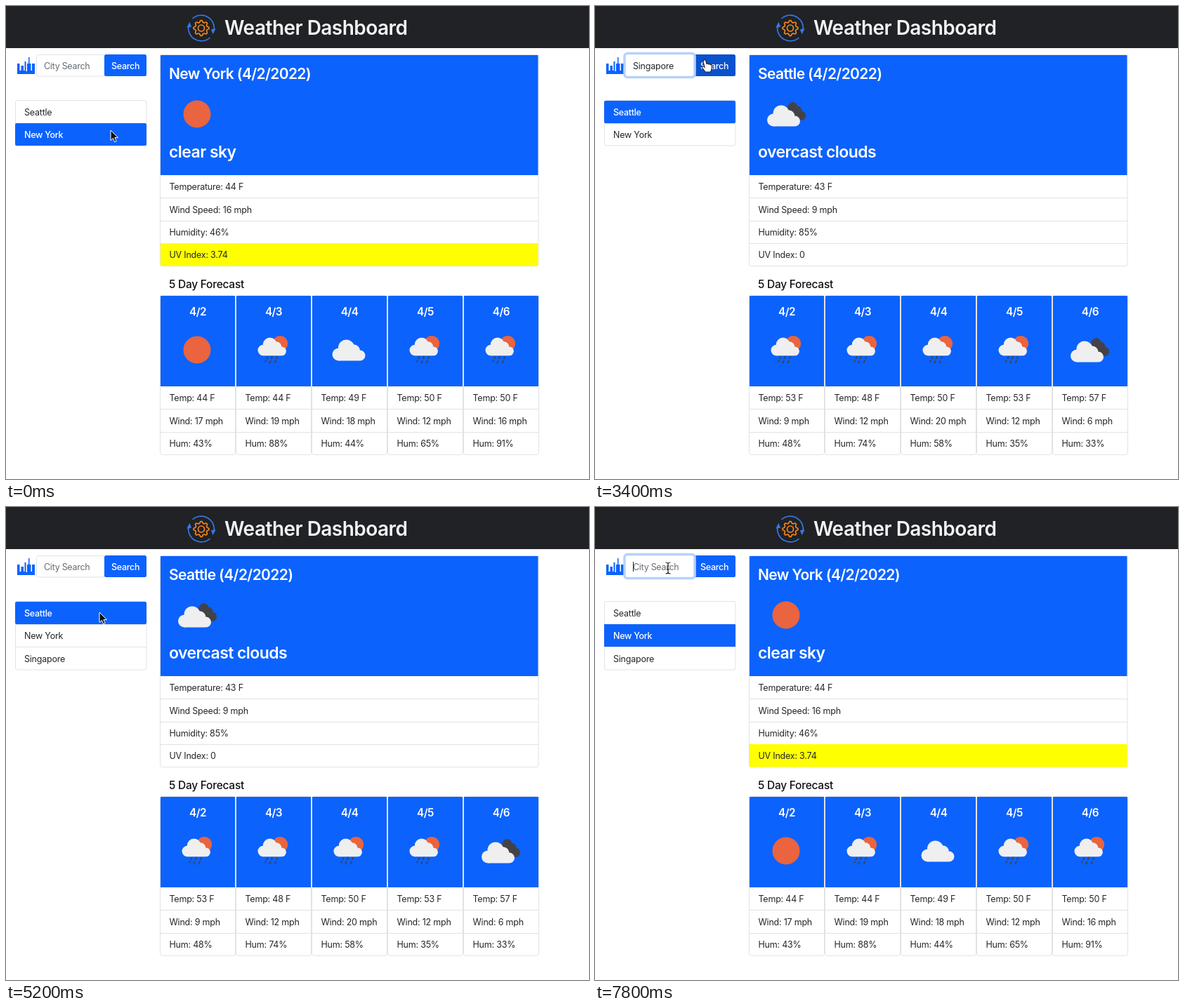
An HTML page that plays this animation: 830 px wide and 674 px high, repeating every 8 s.

```html
<!DOCTYPE html>
<html lang="en">
<head>
<meta charset="utf-8">
<title>Weather Dashboard</title>
<style>
  html, body { margin: 0; width: 100%; height: 100%; overflow: hidden; background: #fff; }
  svg { display: block; width: 830px; height: 674px; }
  text { font: 400 12.5px Inter, "Open Sans", sans-serif; letter-spacing: -.22px; fill: #24272b; white-space: pre; }
  .white { fill: #fff; font-weight: 500; letter-spacing: -.28px; }
  .hint { fill: #666d74; letter-spacing: -.28px; }
  .brand { font-size: 28px; font-weight: 600; letter-spacing: -.53px; fill: #f4f4f5; }
  .place { font-size: 21px; font-weight: 600; letter-spacing: -.65px; fill: #fff; }
  .sky { font-size: 23px; font-weight: 600; letter-spacing: -.58px; fill: #fff; }
  .sub { font-size: 15.5px; font-weight: 500; letter-spacing: -.25px; fill: #111; }
  .day { font-size: 15.3px; font-weight: 600; letter-spacing: -.5px; fill: #fff; text-anchor: middle; }
</style>
</head>
<body>
<svg id="stage" viewBox="0 0 830 674">
  <defs>
    <g id="puff">
      <circle cx="9" cy="21" r="9"/><circle cx="20" cy="11.5" r="11.5"/>
      <circle cx="30.5" cy="15.5" r="8.8"/><circle cx="39.5" cy="22.5" r="7.5"/>
      <path d="M9 16H38V30H9Z"/>
    </g>
    <g id="sun"><circle r="19.5" fill="#e9643f"/></g>
    <g id="cloud"><use href="#puff" x="-23.5" y="-14.5" fill="#efefef"/></g>
    <g id="overcast">
      <use href="#puff" transform="translate(-4 -17) scale(.68 .86)" fill="#434347"/>
      <use href="#puff" x="-27" y="-12.5" fill="#efefef"/>
    </g>
    <g id="rain">
      <circle cx="10.2" cy="-9" r="10.9" fill="#e9643f"/>
      <use href="#puff" transform="translate(-21.5 -17.5) scale(.86)" fill="#efefef"/>
      <path d="M-7.5 10l-1 2M-1 9.5l-1.2 2.6M6 10l-1 2M-10 15l-.8 1.6M-3.5 16l-1.2 2.6M4 15.5l-1.2 2.6"
        stroke="#41424c" stroke-width="1.8" stroke-linecap="round"/>
    </g>
    <path id="arrow" d="M0 0V14.5L3.4 11.4L5.7 16.8L8.2 15.7L5.9 10.5H10.4Z" fill="#111" stroke="#fff"/>
    <path id="beam" d="M-3.5 -8Q0 -8 0 -6Q0 -8 3.5 -8M0 -6V6M-3.5 8Q0 8 0 6Q0 8 3.5 8M-2 2H2" fill="none" stroke="#222" stroke-width="1.2"/>
    <path id="hand" d="M-4 -8Q-2.5 -9.5 -1.5 -7.5L0 -2.5Q1.5 -4 2.7 -2Q4 -3.2 5 -1.3Q7 -2 7.3 .5L7 5Q6.5 7 5.5 9H-2L-6.5 2.5Q-7 .3 -4.5 1L-3 2.3L-5 -6Z" fill="#fff" stroke="#222" stroke-width="1.1"/>
  </defs>
  <g id="scene"></g>
</svg>
<script>
const BLUE = '#0c62fd', DARK_BLUE = '#0a51cd', LINE = '#e1e2e4', LOOP = 8000, STEP = 200;

const weather = {
  'New York': {
    sky: 'clear sky', icon: 'sun', now: [44, 16, 46, 3.74],
    icons: ['sun', 'rain', 'cloud', 'rain', 'rain'],
    temp: [44, 44, 49, 50, 50], wind: [17, 19, 18, 12, 16], hum: [43, 88, 44, 65, 91]
  },
  Seattle: {
    sky: 'overcast clouds', icon: 'overcast', now: [43, 9, 85, 0],
    icons: ['rain', 'rain', 'rain', 'rain', 'overcast'],
    temp: [53, 48, 50, 53, 57], wind: [9, 12, 20, 12, 6], hum: [48, 74, 58, 35, 33]
  },
  Singapore: {
    sky: 'broken clouds', icon: 'overcast', now: [78, 3, 92, 0],
    icons: Array(5).fill('rain'),
    temp: [85, 84, 83, 84, 83], wind: [9, 8, 7, 9, 9], hum: [65, 67, 68, 65, 69]
  }
};

// [time, shown city]
const shown = [[0, 'New York'], [600, 'Seattle'], [4200, 'Singapore'], [5200, 'Seattle'], [6600, 'New York']];

// [time, x, y] of the pointer's hot spot
const route = [
  [0, 149, 177], [200, 148, 175], [400, 136, 153], [1000, 131, 150], [1400, 118, 110],
  [1800, 104, 87], [3000, 104, 87], [3400, 159, 85], [4000, 161, 86], [4600, 161, 86],
  [5000, 134, 151], [5200, 133, 150], [6000, 131, 151], [6400, 119, 181],
  [6800, 119, 180], [7400, 104, 87], [8000, 104, 87]
];

const text = (s, x, y, cls = '') => `<text x="${x}" y="${y}" class="${cls}">${s}</text>`;
const rect = (x, y, w, h, fill, extra = '') =>
  `<rect x="${x}" y="${y}" width="${w}" height="${h}" fill="${fill}" ${extra}/>`;
const use = (id, x, y) => `<use href="#${id}" x="${x}" y="${y}"/>`;
const outline = (x, y, w, h) => rect(x, y, w, h, '#fff', `rx="3" stroke="${LINE}"`);
const rule = (x, y, w) => rect(x, y, w, 1, LINE);

function pointerAt(t) {
  const i = route.findIndex(p => p[0] > t);
  const [a, b] = [route[i - 1], route[i]];
  const k = (t - a[0]) / (b[0] - a[0]);
  return [a[1] + (b[1] - a[1]) * k, a[2] + (b[2] - a[2]) * k];
}

const overBar = ([, y]) => y > 69 && y < 100;
const overButton = p => overBar(p) && p[0] > 140;

function gear(cx, cy) {
  const points = [];
  for (let i = 0; i < 32; i++) {
    const angle = (i - 1.5) * Math.PI / 16;
    const r = i % 4 === 1 || i % 4 === 2 ? 11 : 8.5;
    points.push(`${(cx + r * Math.cos(angle)).toFixed(1)},${(cy + r * Math.sin(angle)).toFixed(1)}`);
  }
  const arc = turn => `<g transform="translate(${cx} ${cy}) rotate(${turn})">
    <path d="M-18 4A18.5 18.5 0 0 1 12 -14" fill="none" stroke="#3478e5" stroke-width="1.6"/>
    <path d="M11 -17.5L16 -10L8.5 -11Z" fill="#3478e5"/></g>`;
  return arc(60) + arc(240) +
    `<g fill="none" stroke="#f5861f" stroke-width="1.7" stroke-linejoin="round">
    <polygon points="${points.join(' ')}"/><circle cx="${cx}" cy="${cy}" r="4.5"/></g>`;
}

const header = rect(0, 0, 830, 60, '#202226') + gear(278, 31.5) + text('Weather Dashboard', 311, 41, 'brand') +
  `<path d="M16 97V82H19.5V92H21.5V85H25V92H26.5V79H28.5V93H30V82H32V73H33.5V82H35.5V92H37V82H41V97Z" fill="${BLUE}"/>`;

function searchBar(t, pointer) {
  const inputFocus = t >= 1800 && t < 3800 || t >= 7400;
  const buttonFocus = t >= 3800 && t < 5000;
  const typed = t >= 2000 && t < 4200 ? 'Singapore'.slice(0, Math.floor((t - 2000) / 130) + 1) : '';
  const ring = (x, w, color) => rect(x, 67.5, w, 34, 'none', `rx="4" stroke="${color}" stroke-width="3.5"`);
  const caret = inputFocus && !typed ? rect(54, 78, 1, 14, '#222') : '';
  return outline(43.5, 69.5, 97, 30.5) +
    rect(140, 69, 60, 31, overButton(pointer) ? DARK_BLUE : BLUE, 'rx="2.5"') +
    (inputFocus ? rect(43, 69, 98, 31, '#fff') + ring(42, 100, '#b9d1fb') : '') +
    (buttonFocus ? ring(138.5, 63, '#86b2fb') : '') +
    text(typed || 'City Search', 54, 89.5, typed ? '' : 'hint') + caret +
    text('Search', 150, 89.5, 'white');
}

function cityList(t, current, pointer) {
  const cities = t < 4200 ? ['Seattle', 'New York'] : ['Seattle', 'New York', 'Singapore'];
  const hovered = Math.floor((pointer[1] - 135) / 32.4);
  const top = i => Math.round(134.7 + i * 32.3);
  const row = (city, i) => {
    const active = city === current || i === hovered;
    const edge = i === 0 || i === cities.length - 1;
    return (active ? rect(13, top(i), 187, top(i + 1) - top(i), BLUE, edge ? 'rx="2"' : '') : i ? rule(13, top(i), 187) : '') +
      text(city, 26, 156 + i * 32.3, active ? 'white' : '');
  };
  return outline(13.5, 134.5, 186.5, top(cities.length) - 134.5) + cities.map(row).join('');
}

function report(city) {
  const w = weather[city];
  const [temp, wind, hum, uv] = w.now;
  const lines = [`Temperature: ${temp} F`, `Wind Speed: ${wind} mph`, `Humidity: ${hum}%`, `UV Index: ${uv}`];
  return outline(219.5, 69.5, 538.5, 301.2) + rect(220, 70, 537.5, 171, BLUE) +
    text(`${city} (4/2/2022)`, 232, 104, 'place') + use(w.icon, 272, 154) + text(w.sky, 232, 216, 'sky') +
    (uv > 3 ? rect(220, 338, 537.5, 32.5, '#ff0') : '') +
    lines.map((s, i) => (i && !(i === 3 && uv > 3) ? rule(219.5, Math.round(241 + i * 32.3), 538.5) : '') +
      text(s, 232.5, 262.3 + i * 32.3)).join('');
}

function forecast(city) {
  const w = weather[city];
  const card = (icon, i) => {
    const x = 219.5 + i * 108;
    const lines = [`Temp: ${w.temp[i]} F`, `Wind: ${w.wind[i]} mph`, `Hum: ${w.hum[i]}%`];
    return outline(x, 412.5, 107, 226.8) + rect(x + .5, 413, 106, 129, BLUE) +
      text(`4/${i + 2}`, x + 53.5, 441, 'day') + use(icon, 272 + i * 108, 490) +
      lines.map((s, n) => (n ? rule(x, Math.round(542 + n * 32.3), 107) : '') +
        text(s, x + 13, 563.4 + n * 32.3)).join('');
  };
  return text('5 Day Forecast', 232, 402, 'sub') + w.icons.map(card).join('');
}

function pointerShape(p) {
  const kind = overButton(p) ? 'hand' : overBar(p) && p[0] > 43 ? 'beam' : 'arrow';
  return use(kind, p[0], p[1]);
}

function draw(t) {
  const city = shown.filter(s => s[0] <= t).pop()[1];
  const pointer = pointerAt(t);
  scene.innerHTML = header + searchBar(t, pointer) + cityList(t, city, pointer) +
    report(city) + forecast(city) + pointerShape(pointer);
}

const scene = document.getElementById('scene');
let start, last = 0;
function tick(now) {
  start ??= now;
  const t = Math.floor((now - start) % LOOP / STEP) * STEP;
  if (t !== last) draw(last = t);
  requestAnimationFrame(tick);
}
draw(0);
requestAnimationFrame(tick);
</script>
</body>
</html>
```
